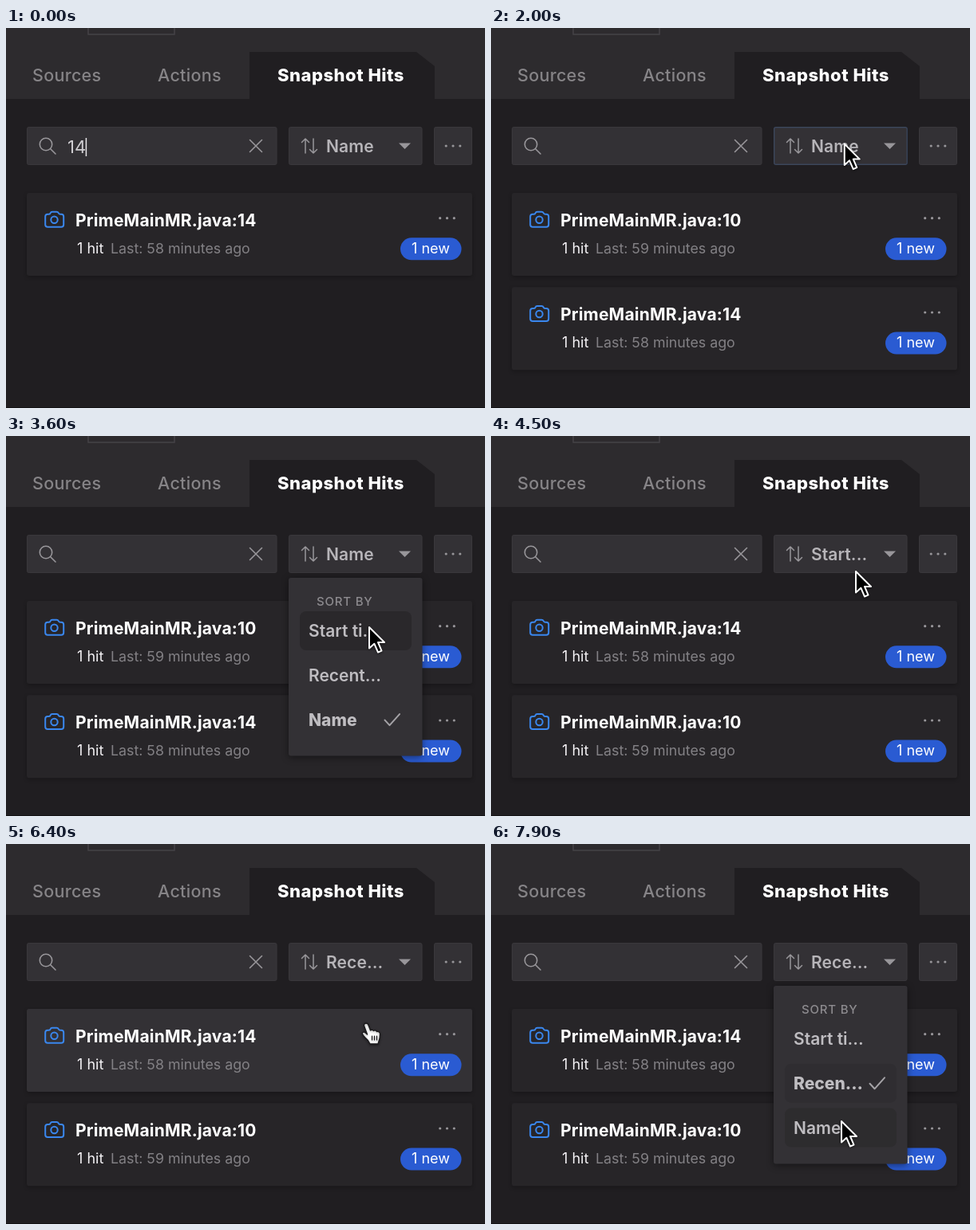
These frames come from a looping animation (600 by 477 pixels, 8000 ms). An HTML page with a canvas:

```html
<!DOCTYPE html>
<html lang="en">
<head>
<meta charset="utf-8">
<title>Snapshot Hits</title>
<style>
html, body { margin: 0; width: 100%; height: 100%; overflow: hidden; background: #201e21; }
canvas { display: block; width: 600px; height: 477px; }
</style>
</head>
<body>
<canvas id="stage"></canvas>
<script>
const W = 600, H = 477, LOOP = 8000, STEP = 100;
const GRAY = '#98969a', PANEL = '#333135', EDGE = '#3a383c', BODY = '#201e21';
const canvas = document.getElementById('stage');
const ratio = window.devicePixelRatio || 1;
canvas.width = W * ratio;
canvas.height = H * ratio;
const c = canvas.getContext('2d');
c.scale(ratio, ratio);

// The pointer enters at 1600 ms, then glides to each stop from its start time
const ENTER = 1600, GLIDE = 400;
const stops = [
  { at: 1700, x: 444, y: 162 },
  { at: 2900, x: 455, y: 240 },
  { at: 4050, x: 457, y: 170 },
  { at: 4500, x: 456, y: 165 },
  { at: 5000, x: 452, y: 288 },
  { at: 5900, x: 451, y: 225 },
  { at: 6400, x: 451, y: 165 },
  { at: 6850, x: 450, y: 272 },
  { at: 7450, x: 439, y: 348 }
];
const menuSpans = [[2400, 3800], [4900, 5800], [6800, LOOP]];
const rows = [
  { plain: 'Start ti...', chosen: 'Start ...', label: 'Start...' },
  { plain: 'Recent...', chosen: 'Recen...', label: 'Rece...' },
  { plain: 'Name', chosen: 'Name', label: 'Name' }
];
const rowY = i => 245 + i * 55.8;
const cardY = i => 207 + i * 118.3;

function pointer(t) {
  if (t < ENTER) return null;
  const p = { x: 436, y: 57 };
  for (const s of stops) {
    const u = Math.min(1, Math.max(0, (t - s.at) / GLIDE));
    const e = u * u * (3 - 2 * u);
    p.x += (s.x - p.x) * e;
    p.y += (s.y - p.y) * e;
  }
  return p;
}

const menuOpen = t => menuSpans.some(([a, b]) => t >= a && t < b);
const sortIndex = t => t < 3800 ? 2 : t < 5800 ? 0 : 1;

// What the pointer is over at a given time
function target(t) {
  const p = pointer(t);
  if (!p) return '';
  if (p.y > 124 && p.y < 170) return 'sort';
  if (menuOpen(t)) {
    const i = rows.findIndex((r, k) => Math.abs(p.y - rowY(k)) < 25);
    return i < 0 ? '' : 'row' + i;
  }
  const i = [0, 1].find(k => p.y > cardY(k) && p.y < cardY(k) + 104);
  return i === undefined ? '' : 'card' + i;
}

// Hover amount, eased by averaging the last 250 ms
function hover(name, t) {
  let n = 0;
  for (let k = 1; k <= 5; k++) if (target(t - k * 50) === name) n++;
  return n / 5;
}

function faded(alpha, paint) {
  if (!alpha) return;
  c.globalAlpha = alpha;
  paint();
  c.globalAlpha = 1;
}

function text(s, x, y, size, weight, color, spacing = 0) {
  c.font = `${weight} ${size}px Inter, "Open Sans", sans-serif`;
  c.letterSpacing = spacing + 'px';
  c.fillStyle = color;
  c.fillText(s, x, y);
}

function box(x, y, w, h, r, fill, stroke, lw = 1) {
  c.beginPath();
  c.roundRect(x, y, w, h, r);
  if (fill) { c.fillStyle = fill; c.fill(); }
  if (stroke) { c.strokeStyle = stroke; c.lineWidth = lw; c.stroke(); }
}

function shadowBox(x, y, w, h, fill, blur, alpha) {
  c.save();
  c.shadowColor = `rgba(0,0,0,${alpha})`;
  c.shadowBlur = blur * ratio;
  c.shadowOffsetY = 2 * ratio;
  box(x, y, w, h, 3, fill);
  c.restore();
}

// SVG path drawn at an offset
function shape(d, x, y, fill, stroke, lw) {
  const p = new Path2D(d);
  c.save();
  c.translate(x, y);
  c.lineCap = c.lineJoin = 'round';
  if (fill) { c.fillStyle = fill; c.fill(p); }
  if (stroke) { c.strokeStyle = stroke; c.lineWidth = lw; c.stroke(p); }
  c.restore();
}

function circle(x, y, r, stroke, lw) {
  c.beginPath();
  c.arc(x, y, r, 0, 7);
  c.strokeStyle = stroke;
  c.lineWidth = lw;
  c.stroke();
}

function dots(x, y) {
  c.fillStyle = GRAY;
  for (let i = -1; i < 2; i++) {
    c.beginPath();
    c.arc(x + i * 8.8, y, 1.6, 0, 7);
    c.fill();
  }
}

function header() {
  c.fillStyle = BODY;
  c.fillRect(0, 0, W, H);
  c.fillStyle = '#2d2b2e';
  c.fillRect(0, 0, W, 89);
  c.strokeStyle = '#454347';
  c.lineWidth = 1.5;
  c.strokeRect(103, -10, 108, 18);
  shape('M0 59V0H209L232 18V59Z', 305, 30, BODY);
  text('Sources', 33, 67, 21.5, 500, '#868487', 0.3);
  text('Actions', 190, 67, 21.5, 500, '#868487', 0.3);
  text('Snapshot Hits', 340, 67, 22, 800, '#ffffff', 0.5);
  c.fillStyle = '#121113';
  c.fillRect(0, 476, W, 1);
}

function search(t) {
  box(26.5, 124.5, 312.5, 47, 2, PANEL, EDGE);
  circle(50, 146, 7.7, GRAY, 1.6);
  shape('M0 0L6.3 6.3', 55.7, 151.7, null, GRAY, 1.6);
  shape('M0 0L15 15M15 0L0 15', 305.5, 140.5, null, GRAY, 1.6);
  const query = t < 900 ? '14' : t < 1300 ? '1' : '';
  text(query, 77, 157, 22, 400, '#cfcdd1');
  const caretX = 77.5 + c.measureText(query).width;
  const lastKey = t < 900 ? -400 : t < 1300 ? 900 : 1300;
  if (t < 2400 && (t - lastKey) % 1000 < 500) {
    c.fillStyle = '#e6e4e8';
    c.fillRect(caretX - 1, 138, 1.5, 23);
  }
}

function toolbar(t) {
  box(354.5, 124.5, 166.5, 47, 2, PANEL, EDGE);
  faded(hover('sort', t), () => box(354.75, 124.75, 166.5, 46.5, 2, null, '#4d87dc', 1.5));
  shape('M4.5 18V0M0 4.5L4.5 0L9 4.5M14.5 0V18M10 13.5L14.5 18L19 13.5', 370.5, 139, null, GRAY, 1.5);
  text(rows[sortIndex(t)].label, 401, 156, 21, 600, '#b7b5b9', 0.1);
  shape('M0 0H15L7.5 7.5Z', 492, 144.5, GRAY);
  box(536.5, 124.5, 47, 47, 2, PANEL, EDGE);
  dots(560, 148);
}

const cameraBody = 'M3.5 4H5Q6.5 4 7 2.5T9.2 1H14.8Q16.3 1 17 2.5T19 4H20.5a3 3 0 0 1 3 3V17a3 3 0 0 1 -3 3H3.5a3 3 0 0 1 -3 -3V7a3 3 0 0 1 3 -3Z';

function card(i, line, t) {
  const y = cardY(i);
  shadowBox(26, y, 558, 104, '#272528', 5, 0.25);
  faded(hover('card' + i, t), () => box(26, y, 558, 104, 3, PANEL));
  shape(cameraBody, 48.7, y + 22.7, null, '#3a87ee', 2);
  circle(60.5, y + 33.7, 4.2, '#3a87ee', 2);
  text('PrimeMainMR.java:' + line, 87, y + 41.5, 21, 700, '#ffffff', 0.2);
  text('1 hit', 89, y + 76, 18, 400, '#f4f2f5');
  text(`Last: ${line === 10 ? 59 : 58} minutes ago`, 131, y + 76, 17.8, 400, '#838185');
  dots(552.5, y + 31.7);
  box(494, y + 56.3, 76.5, 28, 14, '#2a5bd2');
  text('1 new', 508, y + 76, 18, 400, '#ffffff');
}

function menu(t) {
  const picked = sortIndex(t);
  shadowBox(354, 178, 167.5, 223.5, PANEL, 10, 0.45);
  text('SORT BY', 389, 213, 15, 500, '#8d8b8f', 0.8);
  rows.forEach((r, i) => {
    const y = rowY(i), on = i === picked;
    faded(hover('row' + i, t), () => box(368, y - 25, 140, 49, 8, '#2a282b'));
    text(on ? r.chosen : r.plain, 379, y + 7.3, 21, on ? 800 : 600, '#bfbdc1');
    if (on) shape('M0 7.5L6 14L18.5 0', 474.5, y - 7.5, null, '#a5a3a7', 2);
  });
}

const arrow = 'M0 0V26.5L6.3 20.7L11 31.5L15.5 29.6L11 19H19Z';
const hand = 'M-2.5 3Q-2.5 0 0 0T3 2.5L5.5 9Q7.5 7.5 9.5 9.5Q11.5 8 13.5 10.5Q17 10 17.5 13.5L17 19L15 26H5Q3 21 -1.5 17.5Q-6 13 -4 11.5Q-2 10 1.5 14Z';
const creases = 'M7.5 16V21M10.5 16V21M13.5 16V21';

function drawPointer(t) {
  const p = pointer(t);
  if (!p) return;
  c.save();
  c.shadowColor = 'rgba(0,0,0,.4)';
  c.shadowBlur = 3 * ratio;
  c.shadowOffsetY = ratio;
  if (target(t).startsWith('card')) {
    shape(hand, p.x, p.y, '#fff', '#1b1a1c', 1.3);
    shape(creases, p.x, p.y, null, '#1b1a1c', 1.2);
  } else {
    shape(arrow, p.x, p.y, '#000', '#fff', 2);
  }
  c.restore();
}

function draw(t) {
  header();
  search(t);
  toolbar(t);
  const hits = t < 900 ? [14] : t < 3800 ? [10, 14] : [14, 10];
  hits.forEach((n, i) => card(i, n, t));
  if (menuOpen(t)) menu(t);
  drawPointer(t);
}

const start = performance.now();
function tick(now) {
  const t = Math.max(0, now - start) % LOOP;
  draw(Math.floor(t / STEP) * STEP);
  requestAnimationFrame(tick);
}
draw(0);
requestAnimationFrame(tick);
</script>
</body>
</html>
```
